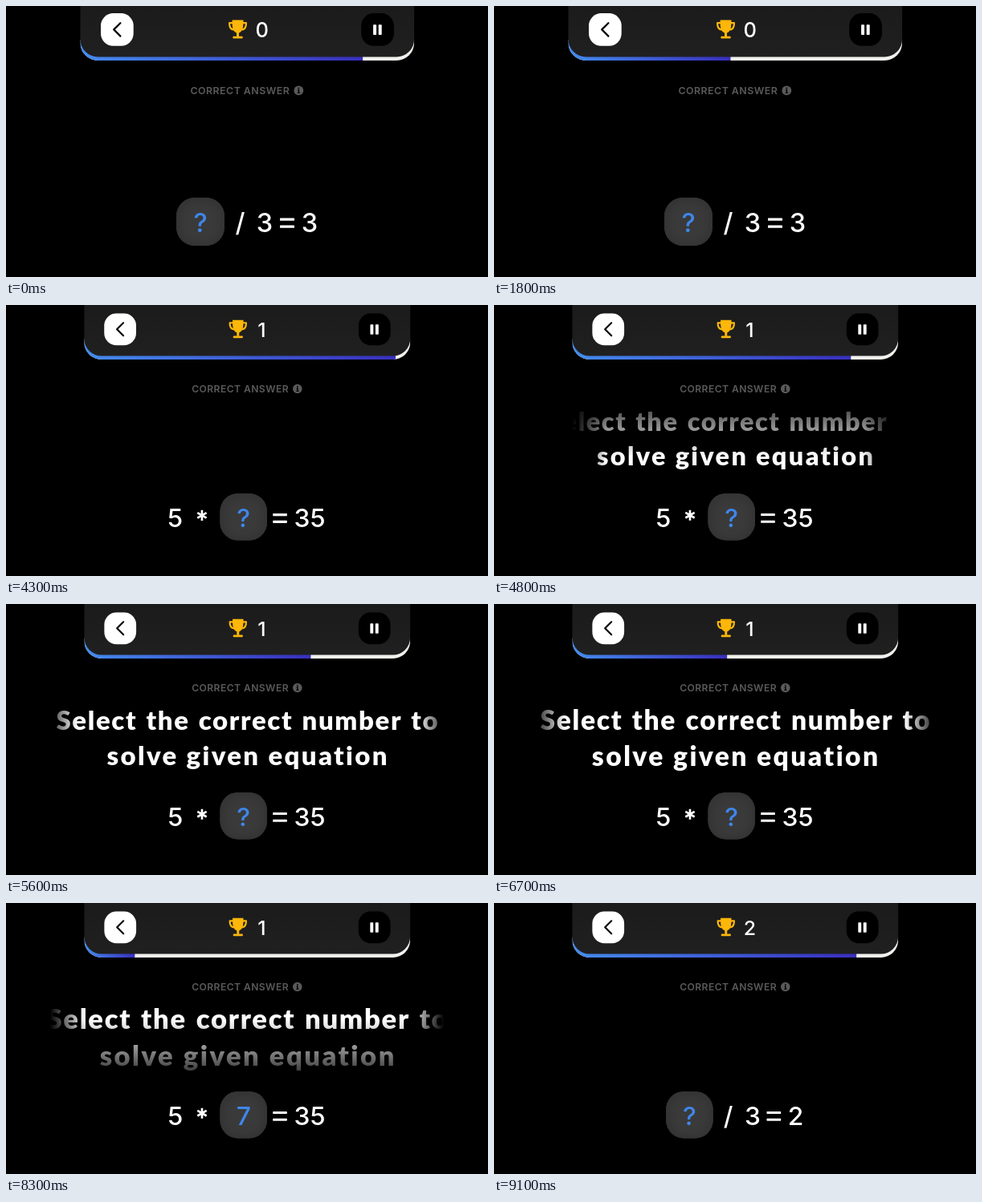
An HTML page with a canvas for the animation above (9200 ms loop, 600 px wide and 338 px high).

```html
<!DOCTYPE html>
<html lang="en">
<head>
<meta charset="utf-8">
<title>Equation quiz</title>
<style>
  html, body { margin: 0; width: 100%; height: 100%; overflow: hidden; background: #000; }
  canvas { display: block; width: 600px; height: 338px; }
</style>
</head>
<body>
<canvas id="stage" width="600" height="338"></canvas>
<script>
const ctx = document.getElementById('stage').getContext('2d');
const LOOP = 9200, STEP = 100, LIMIT = 5000;
const UI = 'Inter, "Liberation Sans", sans-serif';
const TITLE = 'Lato, "Open Sans", sans-serif';
const BLUE = '#3f86ea', GOLD = '#fdb70a', GREY = '#5a5a5a';

// Each round: start time, moment the answer appears, and the equation parts as [text, centre x].
const rounds = [
  { start: -770, reveal: 3660, score: 0, box: 242, answer: '9',
    parts: [['/', 291.5], ['3', 322], ['=', 350], ['3', 378]] },
  { start: 4075, reveal: 8050, score: 1, box: 295.6, answer: '7',
    parts: [['5', 208.5], ['*', 242.6], ['=', 342], ['35', 380]] },
  { start: 8460, reveal: Infinity, score: 2, box: 242, answer: '',
    parts: [['/', 291.5], ['3', 322.5], ['=', 349.5], ['2', 377.5]] }
];

const clamp = (v, lo = 0, hi = 1) => Math.min(hi, Math.max(lo, v));
const smooth = v => { v = clamp(v); return v * v * (3 - 2 * v); };

function linear(x0, y0, x1, y1, ...colours) {
  const g = ctx.createLinearGradient(x0, y0, x1, y1);
  colours.forEach((c, i) => g.addColorStop(i / (colours.length - 1), c));
  return g;
}

function panel(x, y, w, h, r, fill) {
  ctx.beginPath();
  ctx.roundRect(x, y, w, h, r);
  ctx.fillStyle = fill;
  ctx.fill();
}

function label(text, x, y, font, fill, align = 'center', spacing = 0, words = 0) {
  ctx.font = font;
  ctx.fillStyle = fill;
  ctx.textAlign = align;
  ctx.letterSpacing = spacing + 'px';
  ctx.wordSpacing = words + 'px';
  ctx.fillText(text, x, y);
}

function trophy() {
  ctx.fillStyle = ctx.strokeStyle = GOLD;
  ctx.lineWidth = 2.2;
  ctx.beginPath();
  for (const d of [-1, 1]) {
    ctx.moveTo(288.5 + d * 6, 21.2);
    ctx.lineTo(288.5 + d * 10.4, 21.2);
    ctx.bezierCurveTo(288.5 + d * 10.6, 26.5, 288.5 + d * 8.6, 29.2, 288.5 + d * 5, 29.6);
  }
  ctx.stroke();
  ctx.beginPath();
  ctx.moveTo(281.6, 17.6);
  ctx.lineTo(295.4, 17.6);
  ctx.bezierCurveTo(295.6, 26.5, 294.8, 32, 290, 33.6);
  ctx.lineTo(290, 38);
  ctx.lineTo(287, 38);
  ctx.lineTo(287, 33.6);
  ctx.bezierCurveTo(282.2, 32, 281.4, 26.5, 281.6, 17.6);
  ctx.fill();
  panel(282.3, 37.8, 12.4, 2.8, 1, GOLD);
}

// The timer bar only shows below the point where the corners begin to curve.
function timer(round, t, left, width) {
  const done = width * clamp(1 - (t - round.start) / LIMIT);
  ctx.save();
  ctx.beginPath();
  ctx.roundRect(left, -20, width, 88, [0, 0, 22, 22]);
  ctx.clip();
  ctx.fillStyle = '#f2f2ee';
  ctx.fillRect(left, 42, width, 26);
  ctx.fillStyle = linear(left, 0, left + done, 0, '#448cee', '#392fbd');
  ctx.fillRect(left, 42, done, 26);
  ctx.restore();
}

function header(round, t) {
  const left = 92.5, width = 415.6;
  timer(round, t, left, width);
  panel(left, -20, width, 83.5, [0, 0, 22, 22], linear(0, 0, 0, 64, '#1b1b1c', '#202021'));

  panel(118, 9.1, 40.7, 40.6, 15.5, '#fff');
  ctx.strokeStyle = '#000';
  ctx.lineWidth = 2.2;
  ctx.lineCap = ctx.lineJoin = 'round';
  ctx.beginPath();
  ctx.moveTo(142.4, 21.2);
  ctx.lineTo(134.2, 29.4);
  ctx.lineTo(142.4, 37.6);
  ctx.stroke();
  ctx.lineCap = 'butt';

  panel(442.2, 9.1, 40.7, 40.6, 15.5, '#000');
  panel(457.1, 23.2, 4, 12.8, 0.7, '#fff');
  panel(463.7, 23.2, 4, 12.8, 0.7, '#fff');

  trophy();
  label(round.score, 318.8, 39.2, '500 25.5px ' + UI, '#fff');
}

function hint() {
  label('CORRECT ANSWER', 229.5, 109.7, '600 12.4px ' + UI, GREY, 'left', 0.45);
  ctx.beginPath();
  ctx.arc(364.3, 105.4, 5.9, 0, 7);
  ctx.fill();
  ctx.fillStyle = '#000';
  ctx.fillRect(363.5, 101.7, 1.7, 1.7);
  ctx.fillRect(362.9, 104.4, 2.2, 1);
  ctx.fillRect(363.7, 104.4, 1.4, 4);
  ctx.fillRect(362.6, 107.8, 3.5, 1);
}

function equals(x) {
  for (const y of [264.6, 273.6]) panel(x - 9, y, 18, 3.2, 0.6, '#fff');
}

function asterisk(x) {
  ctx.strokeStyle = '#fff';
  ctx.lineWidth = 2.7;
  ctx.beginPath();
  for (let a = Math.PI / 6; a < Math.PI; a += Math.PI / 3) {
    const dx = 6.7 * Math.cos(a), dy = 6.7 * Math.sin(a);
    ctx.moveTo(x - dx, 267 - dy);
    ctx.lineTo(x + dx, 267 + dy);
  }
  ctx.stroke();
}

function equation(round, t) {
  const font = '500 32.5px ' + UI;
  panel(round.box - 30, 239, 60, 60, 23, '#3a3a3a');
  ctx.save();
  ctx.clip();
  ctx.shadowColor = 'rgba(0,0,0,.6)';
  ctx.shadowBlur = 11;
  ctx.shadowOffsetY = 1;
  ctx.strokeStyle = '#333';
  ctx.lineWidth = 2;
  ctx.stroke();
  ctx.restore();
  label(t >= round.reveal ? round.answer : '?', round.box, 282, font, BLUE);
  const drawn = { '=': equals, '*': asterisk };
  for (const [text, x] of round.parts) {
    if (drawn[text]) drawn[text](x);
    else label(text, x, 282, font, '#fff');
  }
}

// Growing title; soft black edges reveal it upwards and later hide it upwards.
function title(t) {
  if (t < 4400 || t > 8800) return;
  const width = 343 + 0.0065 * (t - 4800);
  const size = 33 * width / 349;
  const line = (text, y, gap, words) =>
    label(text, 300 + size * gap / 2, y, `900 ${size}px ${TITLE}`, '#fff', 'center', size * gap, size * words);
  line('Select the correct number to', 157.4, 0.05, 0.06);
  line('solve given equation', 157.4 + width * 0.125, 0.072, 0);

  const shade = (...axis) => {
    ctx.fillStyle = linear(...axis, '#000', 'rgba(0,0,0,0)');
    ctx.fillRect(0, 120, 600, 98);
  };
  const soft = 85;
  const top = 205 - 0.25 * (t - 4400);
  if (top + soft > 120) shade(0, top, 0, top + soft);
  const bottom = 285 - 0.25 * (t - 8080);
  if (bottom - soft < 218) shade(0, bottom, 0, bottom - soft);
  const side = Math.max(46, 97 - 0.1 * (t - 4800)) + 0.04 * Math.max(0, t - 8080);
  shade(side, 0, side + 43, 0);
  shade(600 - side, 0, 557 - side, 0);
}

function draw(t) {
  const round = rounds.filter(r => r.start <= t).pop();
  const zoom = 1 - 0.024 * smooth((t - 3940) / 400);
  ctx.fillStyle = '#000';
  ctx.fillRect(0, 0, 600, 338);
  ctx.save();
  ctx.translate(300, 68);
  ctx.scale(zoom, zoom);
  ctx.translate(-300, -68);
  header(round, t);
  hint();
  equation(round, t);
  ctx.restore();
  title(t);
}

const begin = performance.now();
function frame() {
  const t = (performance.now() - begin) % LOOP;
  draw(Math.floor(t / STEP) * STEP);
  requestAnimationFrame(frame);
}
frame();
</script>
</body>
</html>
```
